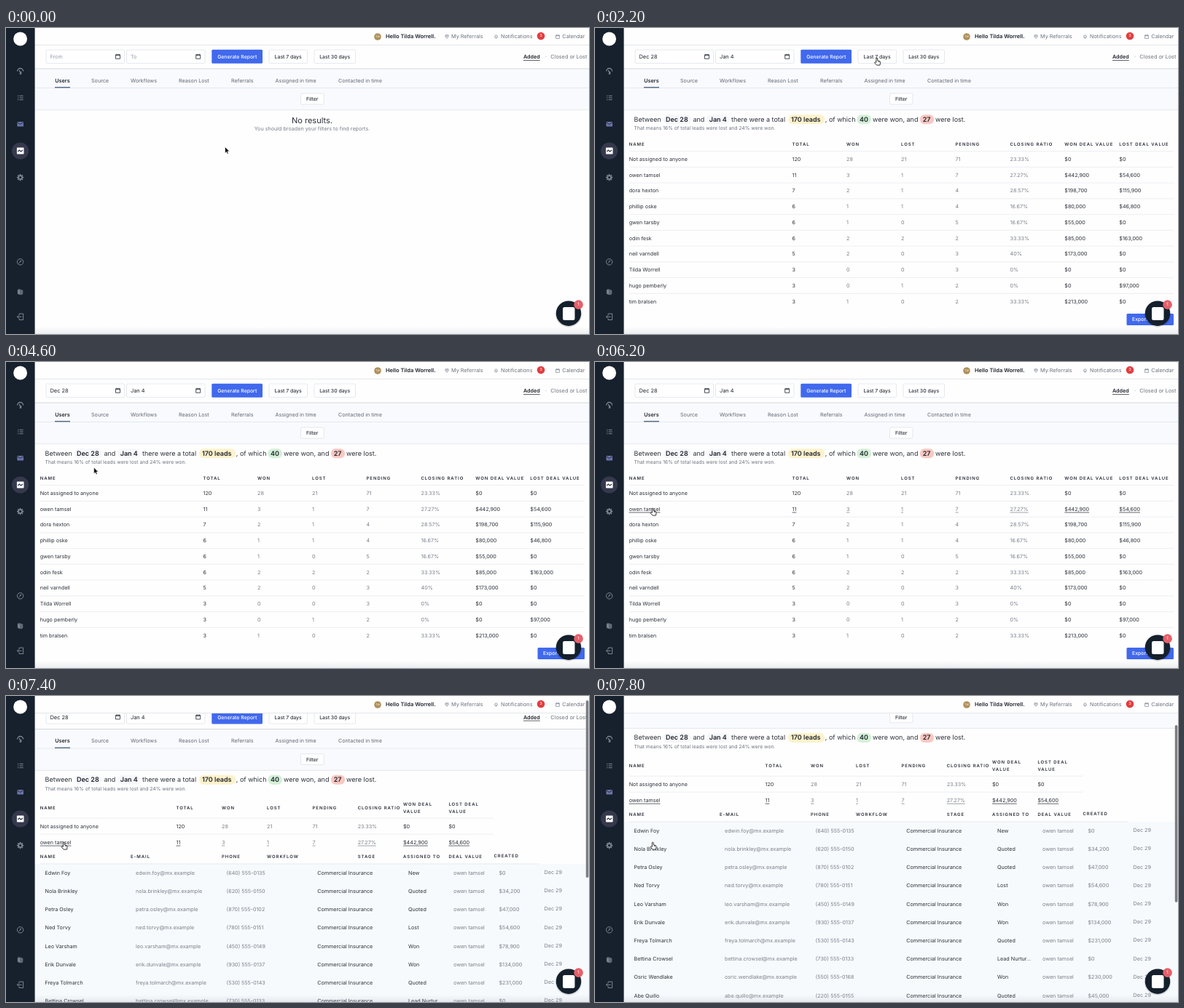
Recreate the animation shown at these times as an HTML page. Size 800 px wide and 421 px high, loop 8 s.

```html
<!DOCTYPE html>
<html lang="en">
<head>
<meta charset="utf-8">
<title>Lead report</title>
<style>
html, body { margin: 0; height: 100%; overflow: hidden; background: #fefefe; }
svg { display: block; width: 800px; height: 421px; }
text { font: 400 7.2px Inter, sans-serif; fill: #2c3038; dominant-baseline: central; text-rendering: geometricPrecision; white-space: pre; }
.gray { fill: #7a7f89; }
.pale { fill: #9298a3; }
.tab { fill: #5f6672; }
.nav { font-size: 7.3px; fill: #6c727d; }
.bold { font-weight: 600; fill: #20242d; }
.date { font-size: 7.4px; fill: #20242d; }
.btn { font-weight: 500; font-size: 6.9px; }
.white { fill: #fff; }
.head { font-weight: 600; font-size: 6px; letter-spacing: .95px; fill: #2b2f38; }
.sum { font-size: 9px; }
.small { font-size: 6.8px; fill: #6c727d; }
.big { font-size: 11px; fill: #2b2f38; }
.mid { text-anchor: middle; }
.under text { text-decoration: underline; text-underline-offset: 1.3px; text-decoration-thickness: .7px; }
.line { stroke: #e9ebf0; stroke-width: .8; }
.icon { fill: none; stroke: #7c8594; stroke-width: 1; }
</style>
</head>
<body>
<svg viewBox="0 0 800 421" id="stage"></svg>
<script>
const text = (x, y, s, cls = '') => `<text x="${x}" y="${y}" class="${cls}">${s}</text>`;
const box = (x, y, w, h, fill, extra = '') => `<rect x="${x}" y="${y}" width="${w}" height="${h}" fill="${fill}" ${extra}/>`;
const dot = (x, y, r, fill) => `<circle cx="${x}" cy="${y}" r="${r}" fill="${fill}"/>`;
const line = (x1, x2, y, extra = 'class="line"') => `<path d="M${x1} ${y}H${x2}" ${extra}/>`;
const group = (id, body, extra = '') => `<g id="${id}" ${extra}>${body}</g>`;
const icon = (x, y, d, extra = '') => `<path class="icon" transform="translate(${x} ${y})" d="${d}" ${extra}/>`;
const outlined = (x, y, w, h) => box(x, y, w, h, '#fff', 'rx="1.5" stroke="#e0e3e9" stroke-width=".8"');
const calendar = (x, y, color, s = 1) =>
  icon(x, y, 'M-3-2.6H3V3H-3ZM-3-1.6H3M-1.5-3.6V-2M1.5-3.6V-2', `style="stroke:${color};stroke-width:${s}"`);
const cells = (xs, y, values, cls) => values.map((v, i) => text(xs[i], y, v, cls(i))).join('');
const money = n => '$' + n.toLocaleString('en-US');

const owner = 'owen tamsel';
const totals = [
  ['Not assigned to anyone', 120, 28, 21, 0, 0],
  [owner, 11, 3, 1, 442900, 54600],
  ['dora hexton', 7, 2, 1, 198700, 115900],
  ['phillip oske', 6, 1, 1, 80000, 46800],
  ['gwen tarsby', 6, 1, 0, 55000, 0],
  ['odin fesk', 6, 2, 2, 85000, 163000],
  ['neil varndell', 5, 2, 0, 173000, 0],
  ['Tilda Worrell', 3, 0, 0, 0, 0],
  ['hugo pemberly', 3, 0, 1, 0, 97000],
  ['tim bralsen', 3, 1, 0, 213000, 0],
].map(([name, all, won, lost, wonValue, lostValue]) => [name, all, won, lost, all - won - lost,
  +(100 * won / all).toFixed(2) + '%', money(wonValue), money(lostValue)]);
const leads = [
  ['Edwin Foy', '(640) 555-0135', 'New', 0],
  ['Nola Brinkley', '(620) 555-0150', 'Quoted', 34200],
  ['Petra Osley', '(870) 555-0102', 'Quoted', 47000],
  ['Ned Torvy', '(780) 555-0151', 'Lost', 54600],
  ['Leo Varsham', '(450) 555-0149', 'Won', 78900],
  ['Erik Dunvale', '(930) 555-0137', 'Won', 134000],
  ['Freya Tolmarch', '(530) 555-0143', 'Quoted', 231000],
  ['Bettina Crowsel', '(730) 555-0133', 'Lead Nurtur...', 0],
  ['Osric Wendlake', '(550) 555-0168', 'Won', 230000],
  ['Abe Quillo', '(220) 555-0155', 'Quoted', 45000],
];

const totalStyle = i => i > 1 && i < 6 ? 'gray' : '';
const leadStyle = i => [0, 3, 4].includes(i) ? '' : 'gray';
const headStyle = () => 'head';

const toolbar =
  outlined(55, 30, 107.5, 18.5) + outlined(165.5, 30, 107.5, 18.5) +
  calendar(153.5, 39.3, '#4a4f5a') + calendar(263.7, 39.3, '#4a4f5a') +
  box(282.3, 29.8, 69.7, 19, '#4169ed', 'rx="1.5"') + text(317.2, 39.6, 'Generate Report', 'btn mid white') +
  outlined(361, 30, 52.5, 18.5) + text(387.2, 39.6, 'Last 7 days', 'btn mid') +
  outlined(423, 30, 56.5, 18.5) + text(451.2, 39.6, 'Last 30 days', 'btn mid') +
  group('added', text(710, 39.6, 'Added', 'bold'), 'class="under"') +
  text(740, 39.6, '·', 'nav') + text(747.3, 39.6, 'Closed or Lost', 'nav') +
  box(40, 56, 760, 57, '#f9fafd') +
  line(40, 800, 56, 'stroke="#d3d7df"') + line(40, 800, 82.5, 'stroke="#dfe4f0" stroke-width=".8"') +
  line(40, 800, 112.7, 'stroke="#dfe4f0" stroke-width=".8"') +
  text(67.3, 72.2, 'Users', 'bold') + line(67, 88, 81.7, 'stroke="#5c6d85" stroke-width="1.5"') +
  cells([117, 171, 237, 309, 369.5, 456], 72.2,
    ['Source', 'Workflows', 'Reason Lost', 'Referrals', 'Assigned in time', 'Contacted in time'], () => 'tab') +
  outlined(404.5, 90, 31.5, 15) + text(420.2, 97.8, 'Filter', 'btn mid');

const empty = text(60.5, 39.6, 'From', 'pale') + text(171, 39.6, 'To', 'pale') +
  text(420, 127, 'No results.', 'big mid') +
  text(420, 138.5, 'You should broaden your filters to find reports.', 'gray mid');

const pill = (x, w, fill) => box(x, 119.2, w, 13, fill, 'rx="6"');
const summary = text(60.5, 39.6, 'Dec 28', 'date') + text(171, 39.6, 'Jan 4', 'date') +
  pill(94, 37.5, '#f6f7fa') + pill(153.5, 30.5, '#f6f7fa') +
  pill(265, 50, '#fdf2cb') + pill(359.5, 19.5, '#d4f0d8') + pill(446, 19, '#fac8c2') +
  cells([53.5, 134.5, 187, 315.8, 381, 467], 126,
    ['Between', 'and', 'there were a total', ', of which', 'were won, and', 'were lost.'], () => 'sum') +
  cells([97, 156.7, 269, 363, 449.7], 126, ['Dec 28', 'Jan 4', '170 leads', '40', '27'], () => 'sum bold') +
  text(53.5, 137.6, 'That means 16% of total leads were lost and 24% were won.', 'small');

const wide = [46.7, 270.5, 345, 420, 494.5, 569.5, 644.3, 719.3];
const narrow = [46.7, 233.5, 296, 358, 420.5, 482.7, 545, 607.4];
const heads = ['NAME', 'TOTAL', 'WON', 'LOST', 'PENDING', 'CLOSING RATIO'];

const closed = cells(wide, 160, [...heads, 'WON DEAL VALUE', 'LOST DEAL VALUE'], headStyle) + line(47, 794, 169.5) +
  totals.map((row, i) => {
    const y = 180.4 + i * 21.75;
    return group(i === 1 ? 'picked' : 'row' + i, cells(wide, y, row, totalStyle)) + (i < 9 ? line(47, 794, y + 10.9) : '');
  }).join('') +
  box(729.5, 393, 64.5, 16, '#4169ed', 'rx="1.5"') + text(737, 400.8, 'Export to CSV', 'btn white');

const opened = cells(narrow, 164.8, heads, headStyle) +
  [545, 607.4].map((x, i) => text(x, 160, ['WON', 'LOST'][i] + ' DEAL', 'head') + text(x, 169.5, 'VALUE', 'head')).join('') +
  line(47, 669, 178.5) + cells(narrow, 189.7, totals[0], totalStyle) + line(47, 669, 200.5) +
  group('chosen', cells(narrow, 211.6, totals[1], totalStyle), 'class="under"') +
  box(40, 241.5, 760, 260, '#f7fafc') + line(47, 732, 241.3, 'stroke="#dfe4f0" stroke-width=".8"') +
  cells([46.7, 171, 296, 358, 482.7, 545, 607.4], 231.9,
    ['NAME', 'E-MAIL', 'PHONE', 'WORKFLOW', 'STAGE', 'ASSIGNED TO', 'DEAL VALUE'], headStyle) +
  text(669.5, 231.2, 'CREATED', 'head') +
  leads.map(([name, phone, stage, value], i) => {
    const y = 253.7 + i * 25.2;
    const mail = name.toLowerCase().replace(' ', '.') + '@mx.example';
    return cells([53.5, 178, 302.6, 427.2, 552, 614, 676.5], y,
      [name, mail, phone, 'Commercial Insurance', stage, owner, money(value)], leadStyle) +
      text(738.6, y - .7, 'Dec 29', 'gray');
  }).join('');

const header = box(39.5, 0, 760.5, 23.5, '#fefefe') + line(39.5, 800, 23.5, 'stroke="#e3e6eb"') +
  dot(510, 12, 4.8, '#b0905a') + text(510, 12.2, 'TW', 'mid white" style="font-size:3.6px') +
  text(521, 11.8, 'Hello Tilda Worrell.', 'bold" style="font-size:7.5px') +
  icon(605, 11.8, 'M-2-2H2V.2L0 2.4-2 .2ZM-1-.6H1', 'style="stroke-width:.8"') + text(611, 11.8, 'My Referrals', 'nav') +
  icon(672.5, 11.8, 'M-1.6 1.3V-.5Q-1.4-2 0-2T1.6-.5V1.3ZM-.7 2.2H.7', 'style="stroke-width:.8"') +
  text(679, 11.8, 'Notifications', 'nav') +
  dot(734, 11, 5.3, '#e23d3f') + text(734, 11.1, '3', 'mid white" style="font-size:5.6px') +
  `<g transform="translate(757 12) scale(.8)">${calendar(0, 0, '#7c8594', .9)}</g>` + text(763.3, 11.8, 'Calendar', 'nav');

const teeth = Array.from({length: 8}, (_, i) => {
  const c = Math.cos(i * Math.PI / 4), s = Math.sin(i * Math.PI / 4);
  return `M${3 * c} ${3 * s}L${4.6 * c} ${4.6 * s}`;
}).join('');
const ring = r => `M${-r} 0A${r} ${r} 0 1 1 ${r} 0A${r} ${r} 0 1 1 ${-r} 0`;
const sidebar = box(0, 0, 39.6, 421, '#17212d') + dot(19.6, 15, 9.4, '#fff') +
  icon(19.6, 59, 'M-4 .5A4 4 0 0 1 4 .5M-1.5-1L1 4M1 1V4H-1', 'style="stroke-width:1.3"') +
  icon(19.6, 96, 'M-1-2.7H4M-1 0H4M-1 2.7H4M-3.7-2.7H-2.3M-3.7 0H-2.3M-3.7 2.7H-2.3') +
  box(15.4, 129, 8.6, 6.6, '#6b74a8', 'rx=".8"') + icon(19.6, 131.5, 'M-4-1.6L0 1 4-1.6', 'style="stroke:#17212d;stroke-width:.9"') +
  dot(19.6, 169, 11.6, '#36384c') + box(14.9, 164.6, 9.6, 9, '#fff', 'rx=".8"') +
  icon(19.6, 169, 'M-3.4 1L-1.3-1 .8 1 3.4-1', 'style="stroke:#26303c;stroke-width:1.1"') +
  icon(19.6, 205.6, ring(2.5) + teeth, 'style="stroke-width:1.7"') +
  icon(19.6, 321.8, ring(4.2) + 'M-2 2L.2-.2 2-2M0 0V-2') +
  icon(19.6, 363, 'M-3.5-3L-.2-1.8V4L-3.5 2.6Z', 'style="fill:#7c8594;stroke-width:.4"') + icon(19.6, 363, 'M-2.5-3.7L3.3-2V3L.5 4V-1.8Z', 'style="fill:#5d6675;stroke-width:.5"') +
  icon(19.6, 397.3, 'M-1.5-2V-4.2H4V4.2H-1.5V2M2 0H-4.2M-2.2-2L-4.2 0-2.2 2');

const chat = `<circle cx="772" cy="393.5" r="18.2" fill="#0002"/>` + dot(772, 392.7, 17.2, '#15202d') +
  box(764, 384, 16.5, 18, '#fff', 'rx="2.5"') +
  dot(785.6, 380.6, 6.3, '#e5606a') + text(785.6, 380.7, '1', 'mid white" style="font-size:6px');

const arrow = '<path d="M0 0V8.7L2 6.9 3.3 9.8 4.8 9.1 3.5 6.3H6.2Z" fill="#111" stroke="#fff" stroke-width=".6"/>';
const hand = '<path d="M-.1.2Q.9-.8 1.8.3V3.4L4.7 4.2Q5.8 4.6 5.6 6L5 9.6H.6L-2.5 6.2Q-2.3 4.5-.1 5.8Z" fill="#fff" stroke="#222" stroke-width=".9"/><path d="M2.9 3.9V5.6M4.3 4.3V5.9" stroke="#222" stroke-width=".6"/>';

document.getElementById('stage').innerHTML =
  '<defs><linearGradient id="fade" x2="0" y2="1"><stop stop-color="#8a93a5" stop-opacity="0"/><stop offset="1" stop-color="#8a93a5" stop-opacity=".16"/></linearGradient></defs>' +
  box(0, 0, 800, 421, '#fefefe') +
  group('page', group('toolbar', toolbar) + group('empty', empty) + group('summary', summary) +
    group('closed', closed) + group('opened', opened)) +
  box(40, 411, 760, 10, 'url(#fade)') + header + sidebar + chat +
  box(795.8, 5.8, 3.6, 244, '#7b7d82', 'rx="1.8" id="thumb"') +
  group('cursor', group('arrow', arrow) + group('hand', hand));

const $ = id => document.getElementById(id);
const show = (id, on) => $(id).setAttribute('display', on ? 'inline' : 'none');
const move = (id, x, y) => $(id).setAttribute('transform', `translate(${x} ${y})`);

const pointer = [[0, 300.5, 163.5], [200, 300.5, 163.5], [1200, 386, 41.5], [4000, 386, 41.5],
  [4600, 120.5, 145], [5200, 120.5, 145], [6000, 78.5, 201.5], [8000, 78.5, 201.5]];
const scrolling = [[0, 0], [7200, 0], [7400, 10.4], [7600, 38], [7800, 68.3], [8000, 68.3]];

function at(keys, t) {
  const i = keys.findIndex(k => k[0] > t), a = keys[i - 1], b = keys[i];
  const u = (t - a[0]) / (b[0] - a[0]), eased = u * u * (3 - 2 * u);
  return a.slice(1).map((v, j) => v + (b[j + 1] - v) * eased);
}

function draw(now) {
  const t = Math.floor(now % 8000 / 200) * 200; // five pictures a second
  const blank = t >= 1600 && t < 2000, loaded = t >= 2000, open = t >= 6800;
  const [x, y] = at(pointer, t), [scroll] = at(scrolling, t);
  const onButton = !blank && x > 361 && x < 413 && y > 30 && y < 49;
  const onRow = loaded && y > 192;
  show('toolbar', !blank);
  show('empty', t < 1600);
  show('summary', loaded);
  show('closed', loaded && !open);
  show('opened', open);
  $('picked').setAttribute('class', onRow ? 'under' : '');
  move('page', 0, -scroll);
  show('thumb', scroll > 0);
  move('thumb', 0, (scroll - 10) * .585);
  move('cursor', x, y);
  show('hand', onButton || onRow);
  show('arrow', !onButton && !onRow);
  requestAnimationFrame(draw);
}
draw(0);
</script>
</body>
</html>
```
